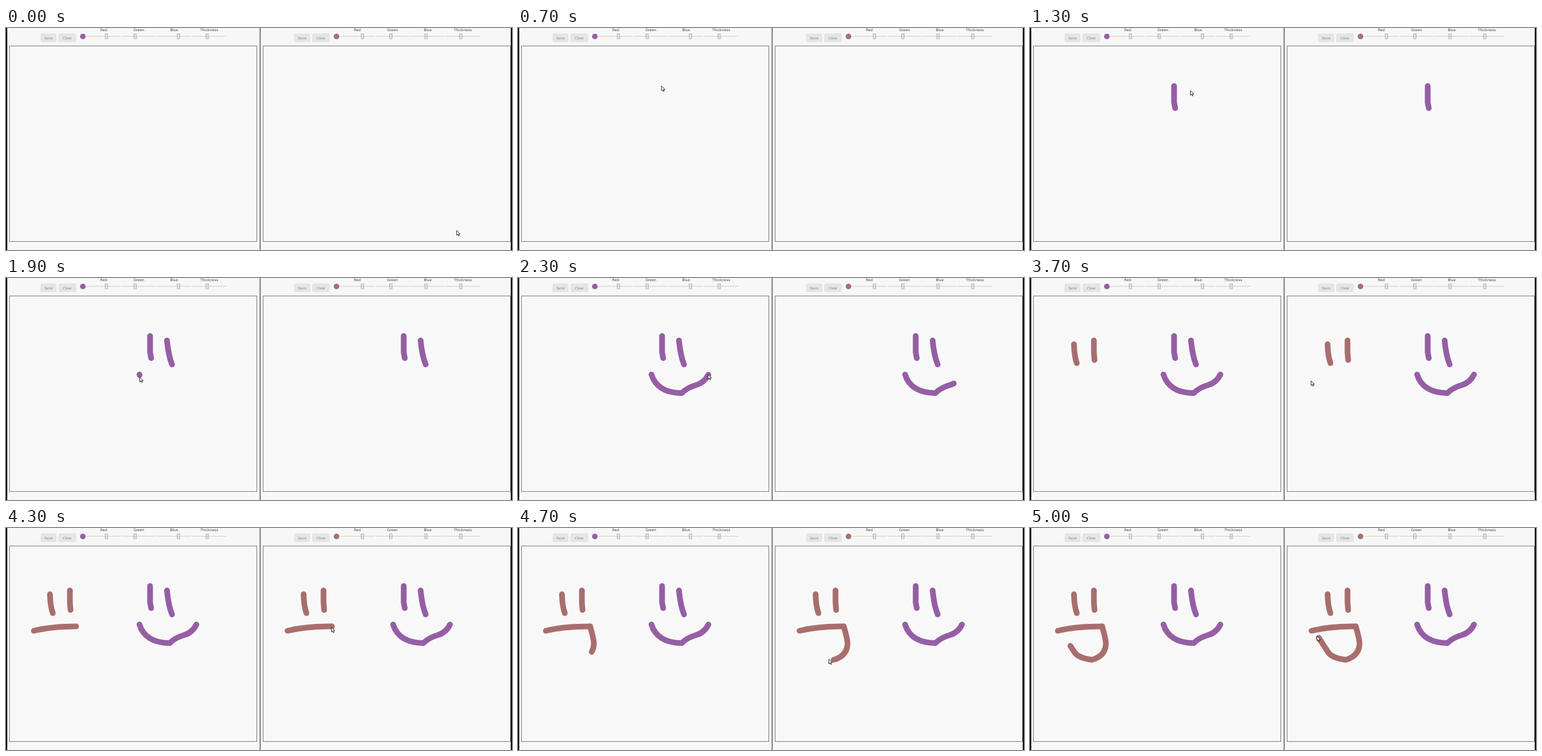
Recreate the animation shown at these times as an HTML page. Size 800x352 px, loop 5100 ms.

```html
<!DOCTYPE html>
<html lang="en">
<head>
<meta charset="utf-8">
<title>Shared whiteboard</title>
<style>
  html, body { margin: 0; width: 100%; height: 100%; overflow: hidden; background: #f7f7f7; }
  svg { display: block; width: 800px; height: 352px; }
  text { font-family: "DejaVu Sans", sans-serif; text-anchor: middle; }
  .label { font-size: 5.7px; fill: #444; }
  .button { font-size: 5.4px; fill: #858585; }
  #ink path { fill: none; stroke-linecap: round; stroke-linejoin: round; stroke-width: 9px; }
</style>
</head>
<body>
<svg viewBox="0 0 800 352">
  <rect width="800" height="352" fill="#f7f7f7"/>
  <g id="ui"></g>
  <rect width="2" height="352" fill="#111"/>
  <rect x="798" width="2" height="352" fill="#111"/>
  <rect x="401" width="1.5" height="352" fill="#6b595d"/>
  <g id="ink"></g>
  <path id="cursor" d="M0 0V7.6L1.8 6 3 8.7 4.3 8.1 3.1 5.6H5.4Z" fill="#fff" stroke="#222" stroke-width=".9"/>
</svg>
<script>
const LOOP = 5100, STEP = 100, PANEL = 401;
const INK_DELAY = 30, SYNC_DELAY = 130;
const PURPLE = '#955ea5', RED = '#a86e6e';
const $ = id => document.getElementById(id);

function add(parent, tag, attrs, text = '') {
  const el = document.createElementNS('http://www.w3.org/2000/svg', tag);
  for (const k in attrs) el.setAttribute(k, attrs[k]);
  el.textContent = text;
  return parent.appendChild(el);
}

function drawPanel(x, color, levels) {
  const g = add($('ui'), 'g', { transform: `translate(${x} 0)` });
  add(g, 'rect', { x: 5.5, y: 28.5, width: 391, height: 310, fill: '#f8f8f8', stroke: '#838383' });
  ['Save', 'Clear'].forEach((name, i) => {
    const left = 54.5 + i * 28.5, width = 25.5 + i * 2.5;
    add(g, 'rect', { x: left, y: 8.5, width, height: 14, rx: 2.5, fill: '#e6e5e5' });
    add(g, 'text', { x: left + width / 2, y: 17.5, class: 'button' }, name);
  });
  add(g, 'circle', { cx: 121.5, cy: 13.4, r: 4.4, fill: color });
  ['Red', 'Green', 'Blue', 'Thickness'].forEach((name, i) => {
    const left = 127.5 + i * 55.6, thumb = left + levels[i] * 54;
    add(g, 'text', { x: left + 27, y: 5.4, class: 'label' }, name);
    add(g, 'rect', { x: left, y: 12.5, width: 54, height: 1.2, fill: '#e3d2c6' });
    add(g, 'rect', { x: thumb - 2, y: 9.5, width: 4, height: 7.5, fill: '#ececec', stroke: '#aaa', 'stroke-width': .9 });
    add(g, 'path', { d: `M${thumb - 1} 13.2h2`, stroke: '#999', 'stroke-width': .8 });
  });
}
drawPanel(0, PURPLE, [.58, .39, .63, .44]);
drawPanel(PANEL, RED, [.65, .45, .45, .44]);

// Each stroke is drawn by the pointer between two times.
const stroke = (color, from, to, d) => {
  const shift = color === PURPLE ? PANEL : -PANEL;
  const copy = (dx, delay) => ({
    delay,
    el: add($('ink'), 'path', { d, stroke: color, pathLength: 1, transform: `translate(${dx} 0)` })
  });
  return { from, to, copies: [copy(0, INK_DELAY), copy(shift, SYNC_DELAY)] };
};
const strokes = [
  stroke('none', 0, 50, 'M713.5 321h.1'),
  stroke(PURPLE, 700, 1100, 'M227.8 92V118L229.5 127'),
  stroke(PURPLE, 1300, 1570, 'M254.5 99Q257 124 262.5 137'),
  stroke(PURPLE, 1850, 2285, 'M211 153Q220 182 259 182.5Q267 174 281 170T301 153'),
  stroke(RED, 2880, 3030, 'M470.5 105Q471 124 475 135'),
  stroke(RED, 3250, 3440, 'M502 99V118L503 130'),
  stroke(RED, 3680, 4240, 'M445 163Q473 156 515 156'),
  stroke(RED, 4250, 5100, 'M515 156Q521 176 521 184Q520 203 499 209Q478 206 472 198L452 167')
];

function ease(t, from, to) {
  const k = Math.min(1, Math.max(0, (t - from) / (to - from)));
  return k * k * (3 - 2 * k);
}

function pointOn({ copies: [{ el }] }, k) {
  return el.getPointAtLength(k * el.getTotalLength());
}

function pointerAt(t) {
  const i = strokes.findLastIndex(s => s.from <= t);
  const s = strokes[i], next = strokes[i + 1];
  const a = pointOn(s, ease(t, s.from, s.to));
  if (t <= s.to || !next) return a;
  const b = pointOn(next, 0), k = ease(t, s.to, next.from);
  return { x: a.x + (b.x - a.x) * k, y: a.y + (b.y - a.y) * k };
}

function render(now) {
  const t = Math.floor((now % LOOP) / STEP) * STEP;
  for (const { from, to, copies } of strokes) {
    for (const { el, delay } of copies) {
      el.style.visibility = t - delay < from ? 'hidden' : 'visible';
      el.style.strokeDasharray = `${ease(t - delay, from, to)} 2`;
    }
  }
  const { x, y } = pointerAt(t);
  $('cursor').setAttribute('transform', `translate(${x - .9} ${y})`);
}

const start = performance.now();
function tick() {
  render(performance.now() - start);
  requestAnimationFrame(tick);
}
tick();
</script>
</body>
</html>
```
